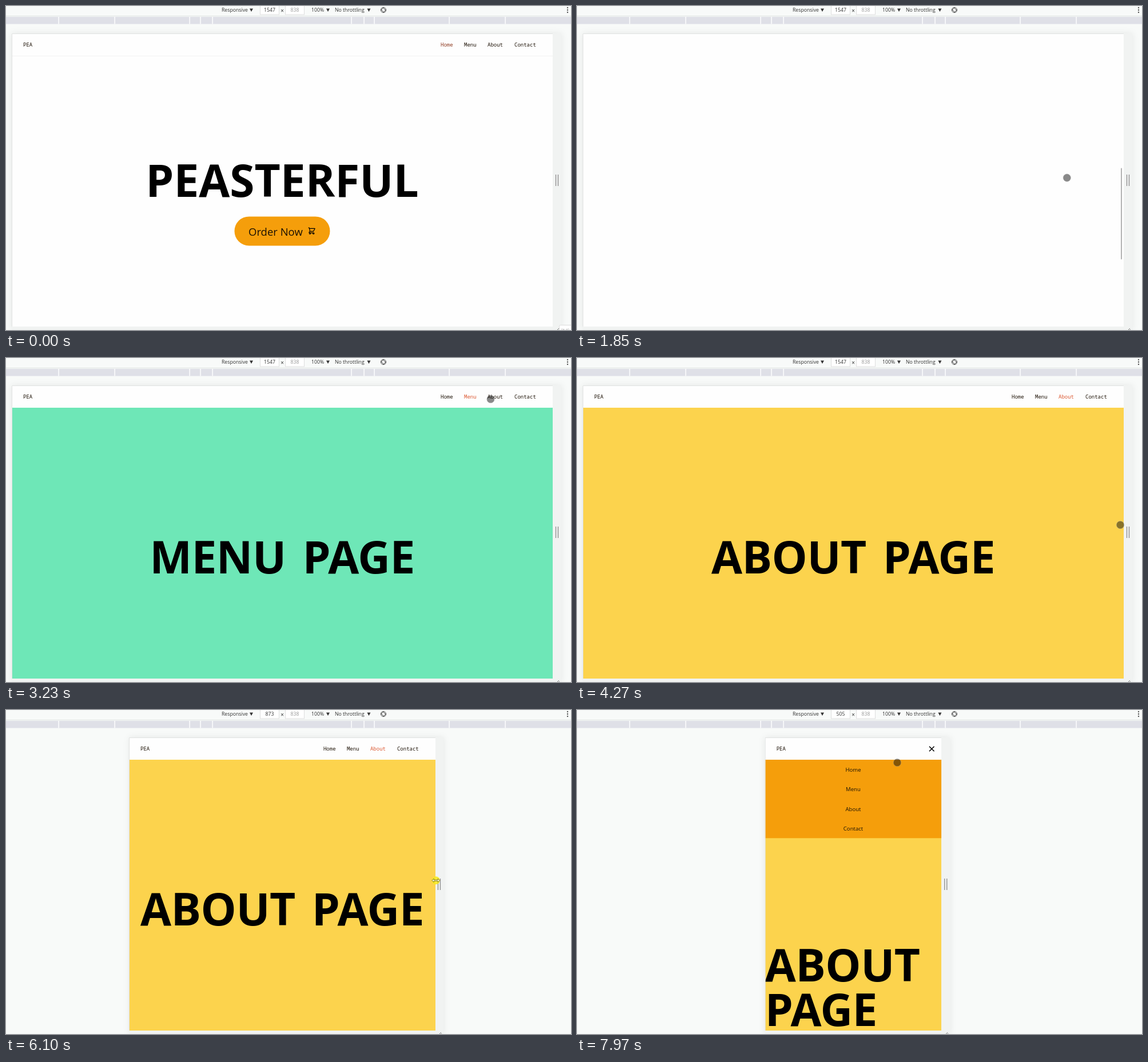
An HTML page for the animation above (8000 ms loop, 988 by 567 pixels).

```html
<!DOCTYPE html>
<html lang="en">
<head>
<meta charset="utf-8">
<title>Responsive site preview</title>
<style>
html, body { margin: 0; width: 100%; height: 100%; overflow: hidden; background: #f8faf9; }
svg { display: block; width: 100%; height: 100%; font-family: "Open Sans", "Noto Sans", sans-serif; }
text { white-space: pre; }
.bar { font-size: 8.7px; fill: #333; }
.mono { font: 9px "Noto Sans Mono", monospace; fill: #1f1408; }
.title { font-size: 78.3px; font-weight: 700; letter-spacing: -.5px; word-spacing: 9px; }
.drop { font-size: 9.6px; fill: #1c1204; }
.mid { text-anchor: middle; }
.line { fill: none; stroke: #000; stroke-width: 1.5; }
</style>
</head>
<body>
<svg viewBox="0 0 988 567" preserveAspectRatio="none">
  <defs><clipPath id="clip"><rect id="clipBox" y="48" height="513"/></clipPath></defs>
  <rect width="988" height="567" fill="#f8faf9"/>

  <g id="device">
    <rect id="shade" y="48" height="519" fill="#f1f3f2" style="filter:drop-shadow(0 0 6px rgba(0,0,0,.08))"/>
    <path id="bars" d="M-2 295v20M2 295v20" stroke="#8c8c8c" stroke-width="1.3"/>
    <path id="grip" d="M-3 568l4 -4M0 568l2 -2" stroke="#777"/>
  </g>

  <g clip-path="url(#clip)">
    <rect id="paper" y="48" height="513" fill="#fefefe"/>
    <g id="scroller">
      <g id="home">
        <text id="brand" class="title mid" x="483" y="334" style="letter-spacing:0">PEASTERFUL</text>
        <g id="button">
          <rect x="399.5" y="368.5" width="167" height="51" rx="25.5" fill="#f59e0b"/>
          <text x="424" y="402" font-size="18.5" fill="#1c1204">Order Now</text>
          <path transform="translate(527.3 386.5) scale(.611)" fill="none" stroke="#000" stroke-width="2" stroke-linecap="round" stroke-linejoin="round"
            d="M3 3h2l.4 2M7 13h10l4-8H5.4M7 13L5.4 5M7 13l-2.3 2.3c-.63.63-.18 1.7.7 1.7H17m0 0a2 2 0 100 4 2 2 0 000-4zm-8 2a2 2 0 11-4 0 2 2 0 014 0z"/>
        </g>
        <rect x="10" y="1626" width="946" height="39"/>
        <text class="mid" x="483" y="1649" font-size="9.95" fill="#fff">Copyright © 2021 PEA All rights reserved</text>
      </g>
      <g id="inner">
        <rect id="hero" y="87" height="513"/>
        <text id="wide" class="title mid" y="377"></text>
        <g id="stacked" class="title">
          <text y="338">ABOUT</text><text y="416">PAGE</text>
        </g>
        <g id="dropdown" class="drop mid">
          <rect id="dropBox" y="87" height="137.3" fill="#f59e0b"/>
        </g>
      </g>
      <rect id="navEdge" y="87" height="1" fill="#f2f2f2"/>
      <text id="logo" class="mono" y="71">PEA</text>
      <g id="links" class="mono"></g>
      <path id="burger" class="line" d="M-23 64h11.5M-23 68h11.5M-23 72h11.5"/>
      <path id="cross" class="line" d="M-21.3 63.7l8.6 8.6M-12.7 63.7l-8.6 8.6"/>
    </g>
    <rect id="thumb" x="951" width="2" height="160" rx="1" fill="#b3b3b3"/>
    <path id="edge" fill="none" stroke="#e1e3e2"/>
  </g>

  <g id="chip">
    <rect x="967.5" y="558.5" width="24" height="12" rx="2" fill="#fff" stroke="#dcdcdc"/>
    <text x="971" y="569" font-size="7" fill="#aaa">(e.g)</text>
  </g>

  <g id="toolbar">
    <path d="M0 17.5H988" stroke="#dfe2e1"/>
    <rect y="19" width="988" height="12.5" fill="#dfe0e7"/>
    <g fill="#fff" stroke="#dedede"><rect x="444.5" y="-2" width="33" height="17"/><rect x="488.5" y="-2" width="33" height="17"/></g>
    <g class="bar">
      <text x="377" y="10">Responsive</text>
      <text id="width" class="mid" x="461" y="10"></text>
      <text class="mid" x="483" y="12" style="font-size:10px">×</text>
      <text class="mid" x="505" y="10" style="fill:#999">838</text>
      <text x="534" y="10">100%</text>
      <text x="575" y="10">No throttling</text>
    </g>
    <path d="M426 4.5h6l-3 5.5zM560 4.5h6l-3 5.5zM631.5 4.5h6l-3 5.5z" fill="#333"/>
    <g fill="none" stroke="#555"><circle cx="660" cy="7" r="4.6"/><rect x="657.5" y="4" width="5" height="6" transform="rotate(-45 660 7)"/></g>
    <g fill="#555"><circle cx="982" cy="3" r="1.2"/><circle cx="982" cy="7" r="1.2"/><circle cx="982" cy="11" r="1.2"/></g>
  </g>

  <g id="cursor">
    <circle id="dot" r="6.6" fill="#000" fill-opacity=".46" stroke="#999" stroke-opacity=".45"/>
    <g id="resize">
      <circle r="7" fill="#f6e81f" fill-opacity=".88"/>
      <path d="M-7 0l3.5 -3v2h7v-2l3.5 3l-3.5 3v-2h-7v2z" fill="#fffbd0" stroke="#777214" stroke-width=".9"/>
    </g>
  </g>
</svg>
<script>
const LOOP = 8000, SCALE = 946 / 1547;
const NS = "http://www.w3.org/2000/svg";
const el = {};
document.querySelectorAll("[id]").forEach(e => el[e.id] = e);

function set(id, attrs) {
  for (const k in attrs) el[id].setAttribute(k, attrs[k]);
}
function show(id, on) { el[id].style.display = on ? "" : "none"; }
function add(parent, tag, attrs, text) {
  const e = document.createElementNS(NS, tag);
  for (const k in attrs) e.setAttribute(k, attrs[k]);
  if (text) e.textContent = text;
  return el[parent].appendChild(e);
}

const NAMES = ["Home", "Menu", "About", "Contact"];
const links = NAMES.map((n, i) => add("links", "text", { x: [-196, -155, -114, -67][i], y: 71 }, n));
const items = NAMES.map((n, i) => add("dropdown", "text", { y: 108.2 + 34.25 * i }, n));
[92, 190, 321, 340, 361, 604, 626, 644, 775, 873].forEach(x =>
  add("toolbar", "rect", { x: x - .6, y: 19, width: 1.4, height: 12.5, fill: "#fff" }));

const linear = u => u;
const smooth = u => u * u * (3 - 2 * u);

// Keys are [time, value, value...]; returns the interpolated values.
function track(keys, t, ease = linear) {
  if (t <= keys[0][0]) return keys[0].slice(1);
  for (let i = 1; i < keys.length; i++) {
    const a = keys[i - 1], b = keys[i];
    if (t < b[0]) {
      const u = ease((t - a[0]) / (b[0] - a[0]));
      return a.slice(1).map((v, j) => v + (b[j + 1] - v) * u);
    }
  }
  return keys[keys.length - 1].slice(1);
}

function bezier(x, x1, y1, x2, y2) {
  const f = (s, a, b) => 3 * (1 - s) * (1 - s) * s * a + 3 * (1 - s) * s * s * b + s * s * s;
  let lo = 0, hi = 1;
  for (let i = 0; i < 20; i++) {
    const m = (lo + hi) / 2;
    if (f(m, x1, x2) < x) lo = m; else hi = m;
  }
  return f(lo, y1, y2);
}
function bounce(t) {
  const p = (t < 1400 ? t / 1000 + .5 : (t - 2320) / 1000 + 2.614) % 1;
  return p < .5 ? -12.75 * (1 - bezier(p * 2, .8, 0, 1, 1))
                : -12.75 * bezier(p * 2 - 1, 0, 0, .2, 1);
}

const SCROLL = [[880, 0], [1160, 1104], [1600, 1104], [2260, 0]];
const FRAME_L = [[4900, 10], [5480, 143], [5760, 150], [6550, 303], [6690, 328], [7000, 328.7]];
const PAGE_L = [[5100, 10], [5480, 55], [5760, 149], [6550, 302], [6690, 326.5], [7000, 328.7]];
const OVERHANG = [[5150, 0], [5480, 6], [5760, 0]];
const CURSOR = [[70, 985, 575], [800, 872, 389], [1640, 872, 389], [2320, 823, 104],
  [2560, 812, 72], [2900, 812, 72], [3320, 857, 72], [3650, 861, 74], [3850, 861, 74],
  [4270, 950, 292], [4530, 961, 299], [4900, 961, 299], [5480, 823, 300], [5760, 816, 300],
  [6550, 667, 296], [6690, 644, 295], [7000, 642, 295], [7360, 622, 70], [7560, 625, 69],
  [7700, 622, 69], [7970, 560, 92]];

function render(t) {
  const page = t < 2640 ? 0 : t < 3790 ? 1 : 2;
  const open = t >= 7680;
  const fl = track(FRAME_L, t)[0], fr = 966 - fl;
  const pl = track(PAGE_L, t)[0], pr = 966 - pl;
  const lr = pr + track(OVERHANG, t)[0], w = lr - pl;
  const scroll = track(SCROLL, t, smooth)[0];
  const compact = w < 768 * SCALE, wrap = w < 502;

  el.width.textContent = Math.round((fr - fl) / SCALE);
  set("shade", { x: fl, width: fr - fl + 15 });
  set("bars", { transform: `translate(${fr + 7.5} 0)` });
  set("grip", { transform: `translate(${fr + 10} 0)` });
  set("clipBox", { x: pl, width: pr - pl });
  set("paper", { x: pl, width: pr - pl });
  set("edge", { d: `M${pl + .5} 561V48.5H${pr}` });
  set("scroller", { transform: `translate(0 ${-scroll})` });

  show("home", page === 0);
  show("inner", page > 0);
  set("button", { transform: `translate(0 ${bounce(t)})` });

  const shift = open ? 137.3 : 0;
  set("hero", { x: pl, width: w, fill: page === 1 ? "#6ee7b7" : "#fcd34d" });
  el.wide.textContent = NAMES[page].toUpperCase() + " PAGE";
  set("wide", { x: (pl + lr) / 2 });
  show("wide", !wrap);
  set("stacked", { transform: `translate(${pl} ${shift})` });
  show("stacked", wrap);

  show("dropdown", open);
  set("dropBox", { x: pl, width: w });
  items.forEach(e => e.setAttribute("x", (pl + lr) / 2));

  set("navEdge", { x: pl, width: w });
  show("navEdge", page === 0);
  set("logo", { x: pl + 20 });
  set("links", { transform: `translate(${lr} 0)` });
  show("links", !compact);
  const active = t < 450 ? "#8f3a20" : "#dc5a34";
  links.forEach((e, i) => e.style.fill = i === page ? active : "");
  for (const id of ["burger", "cross"]) set(id, { transform: `translate(${pr} 0)` });
  show("burger", compact && !open);
  show("cross", compact && open);

  show("thumb", (t > 880 && t < 1500) || (t > 1600 && t < 2640));
  set("thumb", { y: 51 + scroll / 1104 * 344 });
  show("chip", t < 400);

  const [cx, cy] = track(CURSOR, t);
  const resizing = t >= 4780 && t < 7060;
  set("cursor", { transform: `translate(${cx} ${cy})` });
  show("cursor", t > 70);
  show("dot", !resizing);
  show("resize", resizing);
}

function tick() {
  render(performance.now() % LOOP);
  requestAnimationFrame(tick);
}
tick();
</script>
</body>
</html>
```
